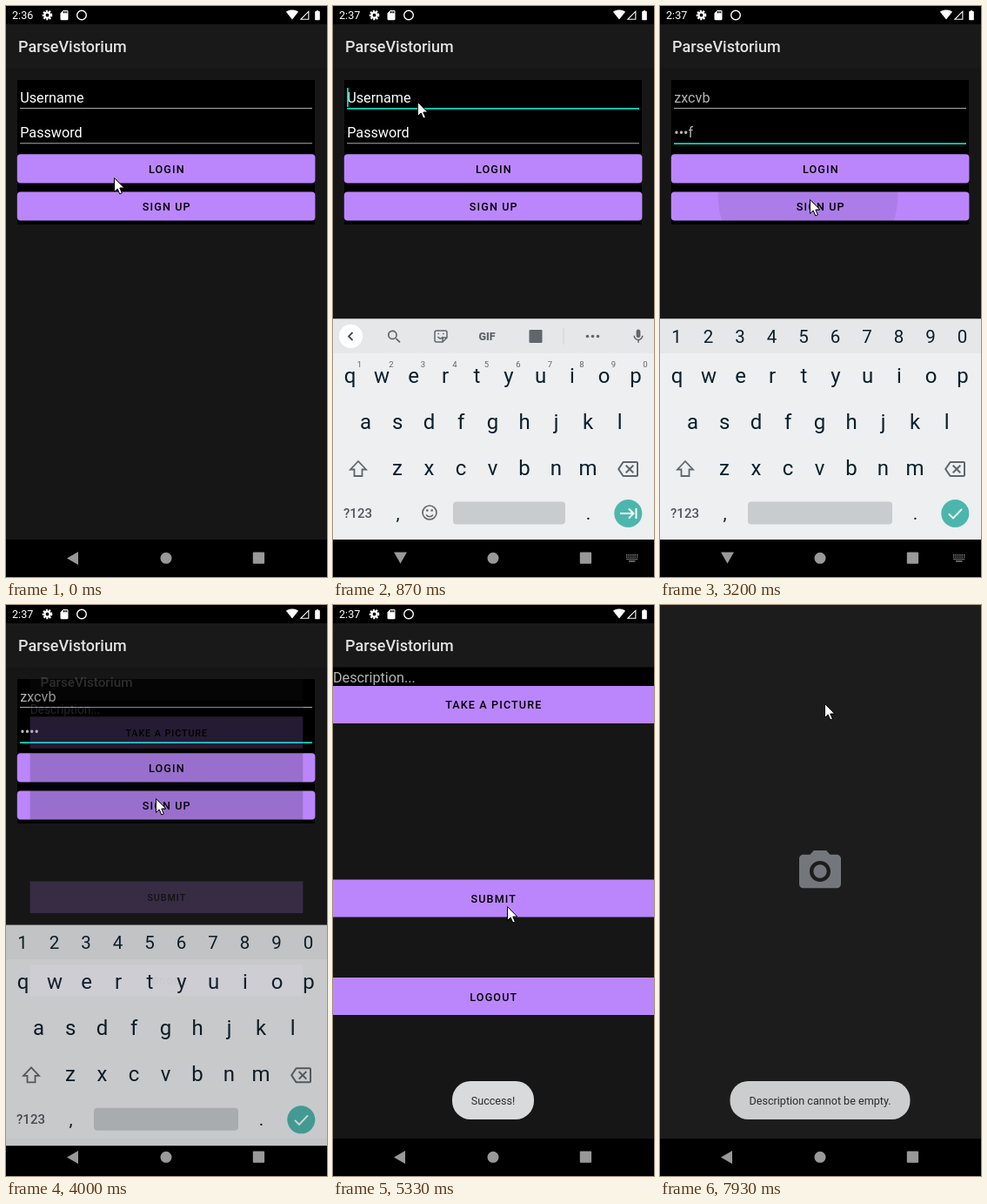
An HTML page with a canvas that plays this animation: 369 by 656 pixels, repeating every 8000 ms.

```html
<!DOCTYPE html>
<html lang="en">
<head>
<meta charset="utf-8">
<title>Login demo</title>
<style>
html, body { margin: 0; width: 369px; height: 656px; overflow: hidden; background: #000 }
canvas { display: block }
</style>
</head>
<body>
<canvas id="stage" width="369" height="656"></canvas>
<script>
const LOOP = 8000, STEP = 1000 / 15;
const W = 369, H = 656, NAV = 613;
const PURPLE = '#bb86fc', TEAL = '#03dac5', DARK = '#161616', BAR = '#191919', INK = '#0b1e2b', GREY = '#5f676c';
const USER = 'zxcvb', USER_TIMES = [1130, 1200, 1260, 1260, 1530];
const PASS = 'asdf', PASS_TIMES = [2060, 2130, 2200, 2330];

const buffer = new OffscreenCanvas(W, H).getContext('2d');
let ctx = document.getElementById('stage').getContext('2d');

const ICONS = {
  sd: 'M18 2h-8L4 8v12c0 1.1.9 2 2 2h12c1.1 0 2-.9 2-2V4c0-1.1-.9-2-2-2zm-6 6h-2V4h2zm3 0h-2V4h2zm3 0h-2V4h2z',
  wifi: 'M12 21 23.6 6.5C23.2 6.2 18.7 3 12 3S.8 6.2.4 6.5z',
  signal: 'M2 22h20V2zm18-2H6.8L20 6.8z',
  battery: 'M15.7 4H14V2h-4v2H8.3C7.6 4 7 4.6 7 5.3v15.4C7 21.4 7.6 22 8.3 22h7.4c.7 0 1.3-.6 1.3-1.3V5.3C17 4.6 16.4 4 15.7 4z',
  camera: 'M9 2 7.2 4H4c-1.1 0-2 .9-2 2v12c0 1.1.9 2 2 2h16c1.1 0 2-.9 2-2V6c0-1.1-.9-2-2-2h-3.2L15 2zm3 15c-2.8 0-5-2.2-5-5s2.2-5 5-5 5 2.2 5 5-2.2 5-5 5zM8.8 12a3.2 3.2 0 1 0 6.4 0 3.2 3.2 0 1 0-6.4 0',
  search: 'M15.5 14h-.8l-.3-.3A6.5 6.5 0 1 0 13.7 14.4l.3.3v.8l5 5 1.5-1.5zm-6 0a4.5 4.5 0 1 1 0-9 4.5 4.5 0 0 1 0 9z',
  mic: 'M12 14c1.7 0 3-1.3 3-3V5c0-1.7-1.3-3-3-3S9 3.3 9 5v6c0 1.7 1.3 3 3 3zm5-3c0 2.8-2.2 5-5 5s-5-2.2-5-5H5c0 3.5 2.6 6.4 6 6.9V21h2v-3.1c3.4-.5 6-3.4 6-6.9z',
  erase: 'M22 3H7c-.7 0-1.2.3-1.6.9L0 12l5.4 8.1c.4.5.9.9 1.6.9h15c1.1 0 2-.9 2-2V5c0-1.1-.9-2-2-2zm0 16H7.1L2.4 12l4.7-7H22zm-11.6-2L14 13.4l3.6 3.6 1.4-1.4-3.6-3.6L19 8.4 17.6 7 14 10.6 10.4 7 9 8.4l3.6 3.6L9 15.6z'
};

// Pointer path: time, x, y
const POINTER = [
  [0, 124, 197], [270, 92, 118], [470, 92, 118], [870, 97, 110], [1660, 97, 110], [1870, 100, 147],
  [2660, 100, 147], [2930, 172, 222], [4740, 172, 222], [4930, 149, 154], [5070, 200, 346],
  [6000, 200, 346], [6470, 191, 154], [6930, 189, 113], [LOOP, 189, 113]
];

const ramp = (t, a, b) => Math.min(1, Math.max(0, (t - a) / (b - a)));
const smooth = p => p * p * (3 - 2 * p);
const easeOut = (p, power) => 1 - Math.pow(1 - p, power);
const within = (t, a, b) => t >= a && t < b;
const typed = (times, t) => times.filter(k => t >= k).length;

function rect(x, y, w, h, color, r = 0) {
  ctx.fillStyle = color;
  ctx.beginPath();
  ctx.roundRect(x, y, w, h, r);
  ctx.fill();
}
function disc(x, y, r, color) {
  ctx.fillStyle = color;
  ctx.beginPath();
  ctx.arc(x, y, r, 0, 7);
  ctx.fill();
}
function shape(d, color, rule = 'nonzero') {
  ctx.fillStyle = color;
  ctx.fill(new Path2D(d), rule);
}
function line(d, color, width = 1.6) {
  ctx.strokeStyle = color;
  ctx.lineWidth = width;
  ctx.stroke(new Path2D(d));
}
function text(str, x, y, size, color, { align = 'left', weight = 400, spacing = 0 } = {}) {
  ctx.font = `${weight} ${size}px Roboto, sans-serif`;
  ctx.letterSpacing = spacing + 'px';
  ctx.textAlign = align;
  ctx.fillStyle = color;
  ctx.fillText(str, x, y);
}
const centered = (str, x, y, size, color, weight) => text(str, x, y, size, color, { align: 'center', weight });
function icon(name, cx, cy, size, color) {
  scoped(() => {
    ctx.translate(cx - size / 2, cy - size / 2);
    ctx.scale(size / 24, size / 24);
    shape(ICONS[name], color);
  });
}
function scoped(draw) {
  ctx.save();
  draw();
  ctx.restore();
}
// Draws a whole layer first, then blends it as one
function group(alpha, draw) {
  if (alpha <= 0) return;
  const page = ctx;
  ctx = buffer;
  ctx.clearRect(0, 0, W, H);
  scoped(draw);
  ctx = page;
  scoped(() => {
    ctx.globalAlpha = alpha;
    ctx.drawImage(buffer.canvas, 0, 0);
  });
}
function zoom(s) {
  ctx.translate(W / 2, H / 2);
  ctx.scale(s, s);
  ctx.translate(-W / 2, -H / 2);
}

function button(label, x, y, w, h, r, baseline) {
  rect(x, y, w, h, PURPLE, r);
  text(label, 184.8, baseline, 12.6, '#000', { align: 'center', weight: 500, spacing: 1.12 });
}
function appBar() {
  rect(0, 21, W, 50.5, BAR);
  text('ParseVistorium', 14, 53, 18, '#e2e2e2', { weight: 500 });
}

function field(hint, value, baseline, focused, caretOn) {
  text(value || hint, 16.2, baseline, 16.2, value ? '#b4b4b4' : '#fff');
  const caretX = value ? 16.2 + ctx.measureText(value).width : 16;
  if (caretOn) rect(caretX, baseline - 17, 1.8, 22, TEAL);
  rect(16, baseline + 6, 336, focused ? 1.8 : 1, focused ? TEAL : '#aaa');
}

function login(t) {
  rect(0, 21, W, NAV - 21, DARK);
  appBar();
  rect(13, 85, 342, 166, '#000');
  const onUser = within(t, 460, 1790), onPass = t >= 1790;
  field('Username', USER.slice(0, typed(USER_TIMES, t)), 111, onUser, onUser);
  const n = typed(PASS_TIMES, t);
  const shown = t >= 3800 ? n : n - 1;
  const secret = n ? '•'.repeat(shown) + PASS.slice(shown, n) : '';
  field('Password', secret, 151.3, onPass, within(t, 1790, 2800) || within(t, 3320, 3800));
  button('LOGIN', 12.8, 170.3, 342.6, 33.2, 4, 191.5);
  button('SIGN UP', 12.8, 213.4, 342.6, 33.2, 4, 234.6);
  if (within(t, 3190, 3600)) scoped(() => {
    ctx.globalAlpha = 0.08 * (1 - ramp(t, 3320, 3600));
    ctx.beginPath();
    ctx.roundRect(12.8, 213.4, 342.6, 33.2, 4);
    ctx.clip();
    disc(170, 216, 103.5 + (t - 3200) * 0.6, '#000');
  });
}

function compose() {
  rect(0, 21, W, NAV - 21, DARK);
  appBar();
  rect(0, 71.5, W, 22, '#000');
  text('Description...', 0, 89, 16.2, '#b4b4b4');
  button('TAKE A PICTURE', 0, 93, W, 43, 0, 119.2);
  button('SUBMIT', 0, 315.5, W, 43, 0, 342);
  button('LOGOUT', 0, 428, W, 43, 0, 454.5);
}

function camera(t) {
  rect(0, t >= 7860 ? 0 : 21, W, NAV, '#1c1c1c');
  rect(0, NAV, W, H - NAV, '#000');
  group(ramp(t, 7800, 7920), () => icon('camera', 184, 306, 57.6, '#73777b'));
}

function statusBar(t) {
  rect(0, 0, W, 21, '#000');
  if (t >= 7530) return;
  text(t < 460 ? '2:36' : '2:37', 7, 15, 12.6, '#fff');
  ctx.setLineDash([2, 1.4]);
  line('M52.2 10.5a4.7 4.7 0 1 0-9.4 0a4.7 4.7 0 1 0 9.4 0', '#fff', 2.2);
  ctx.setLineDash([]);
  line('M50.6 10.5a3.1 3.1 0 1 0-6.2 0a3.1 3.1 0 1 0 6.2 0', '#fff', 2.4);
  icon('sd', 67, 10.5, 13.5, '#fff');
  line('M92.3 10.5a5.3 5.3 0 1 0-10.6 0a5.3 5.3 0 1 0 10.6 0', '#fff', 1.4);
  icon('wifi', 329, 10, 14.5, '#fff');
  icon('signal', 343, 10.3, 13, '#fff');
  icon('battery', 358, 10.5, 13.5, '#fff');
}

function navIcons(keyboardUp) {
  const color = '#999';
  shape(keyboardUp ? 'M70 627.500h15l-7.500 13z' : 'M83 627v15l-13-7.500z', color);
  disc(184, 634.3, 6.5, color);
  rect(283.8, 627.5, 13.3, 13.3, color, 1);
  if (!keyboardUp) return;
  for (let i = 0; i < 12; i++) rect(337 + i % 6 * 2.4, 630 + (i / 6 | 0) * 2.4, 1.4, 1.4, '#888');
  rect(337, 634.8, 13.4, 1.4, '#666');
  rect(340, 637.2, 7.4, 1.4, '#888');
}

function keyRow(keys, x, baseline, size) {
  [...keys].forEach((key, i) => centered(key, x + i * 36.5, baseline, size, INK));
}

function toolbar(word) {
  disc(20.5, 379.3, 13.6, '#fff');
  line(word ? 'M18.500 375l4.500 4.500l-4.500 4.500' : 'M22.500 375l-4.500 4.500l4.500 4.500', '#444c52', 1.8);
  icon('mic', 351, 379.5, 19, GREY);
  if (word) {
    [word, word + 's', word + 'er'].forEach((w, i) => centered(w, 84 + i * 100, 384, 14.5, INK));
    rect(134, 371, 1, 18, '#cfd4d7');
    rect(234, 371, 1, 18, '#cfd4d7');
    return;
  }
  icon('search', 70.5, 380, 20, GREY);
  line('M119 373h10q2 0 2 2v6l-5 5h-7q-2 0-2-2v-9q0-2 2-2zM131 381h-3q-2 0-2 2v3M120.500 380q3 4 6 0M120.500 376.500h1.500M126 376.500h1.500', GREY, 1.5);
  centered('GIF', 177, 383.5, 12.5, GREY, 900);
  rect(225.5, 372, 15, 15, GREY, 1);
  rect(264.5, 370, 1, 19, '#cfd4d7');
  for (const x of [292.5, 298.5, 304.5]) disc(x, 379.5, 1.8, GREY);
}

function keyboard(t) {
  const digits = t >= 1860;
  rect(0, 359.5, W, NAV - 359.5, '#edeff1');
  rect(0, 359.5, W, 39.5, '#e5e7e9');
  if (digits) keyRow('1234567890', 19, 387, 20.5);
  else {
    toolbar(USER.slice(0, typed(USER_TIMES, t)));
    [...'1234567890'].forEach((d, i) => centered(d, 30.5 + i * 36.5, 415, 9.5, GREY));
  }
  keyRow('qwertyuiop', 19.5, 433, 24);
  keyRow('asdfghjkl', 37.6, 486, 24);
  keyRow('zxcvbnm', 74, 539, 24);
  line('M29 523l-9 9.500h4.500v7.500h9v-7.500h4.500z', GREY, 1.8);
  icon('erase', 339, 532, 24, GREY);
  centered('?123', 28.5, 588, 15, '#4c565c', 500);
  centered(',', 74.5, 590, 21, INK);
  centered('.', 293.5, 590, 21, INK);
  const spaceX = digits ? 101 : 138;
  rect(spaceX, 569.5, 267 - spaceX, 26, '#c8cccf', 4);
  if (!digits) {
    line('M119 582a8 8 0 1 0-16 0a8 8 0 1 0 16 0M107 584.500q4 4.500 8 0', GREY);
    disc(108.3, 579.5, 1.3, GREY);
    disc(113.7, 579.5, 1.3, GREY);
  }
  disc(339.3, 583, 16, '#4db6ac');
  line(digits ? 'M332 583.500l5 5l10-10.500' : 'M330 583h15M340 577.500l5.500 5.500l-5.500 5.500M348.500 577v12', '#fff', 1.9);
}

function toast(message, width, alpha) {
  group(alpha, () => {
    rect(184 - width / 2, 547, width, 44, '#d9dadb', 21);
    centered(message, 184, 574, 12.6, '#2b2b2b');
  });
}

function pointer(t) {
  const i = POINTER.findIndex((k, j) => j && t <= k[0]);
  const [t0, x0, y0] = POINTER[i - 1], [t1, x1, y1] = POINTER[i];
  const p = smooth(ramp(t, t0, t1));
  scoped(() => {
    ctx.translate(x0 + (x1 - x0) * p, y0 + (y1 - y0) * p);
    const arrow = 'M.5.5v16l3.700-3.500l2.600 6l2.600-1.100l-2.600-5.900h5z';
    shape(arrow, '#fff');
    line(arrow, '#000', 1);
  });
}

function draw(t) {
  rect(0, 0, W, H, '#000');
  const opening = easeOut(ramp(t, 4000, 4440), 8);
  const closing = easeOut(ramp(t, 3980, 4200), 2);
  const keyboardUp = within(t, 530, 4000);

  if (t < 4130) scoped(() => {
    zoom(1 + 0.05 * opening);
    login(t);
  });
  if (within(t, 4000, 7530)) group(ramp(t, 3980, 4080), () => {
    zoom(0.85 + 0.15 * opening);
    compose();
  });
  statusBar(t);
  rect(0, NAV, W, H - NAV, '#000');

  if (keyboardUp) scoped(() => {
    ctx.beginPath();
    ctx.rect(0, 0, W, NAV);
    ctx.clip();
    ctx.translate(0, 253 * (1 - easeOut(ramp(t, 500, 800), 2)));
    keyboard(t);
  });
  if (t >= 4000) group(1 - closing, () => {
    ctx.translate(0, 48 * closing);
    zoom(1 + 0.05 * opening);
    keyboard(t);
  });

  if (t >= 7530) camera(t);
  navIcons(keyboardUp);
  toast('Success!', 94, easeOut(ramp(t, 4040, 4490), 3) * (1 - ramp(t, 5820, 6120)));
  toast('Description cannot be empty.', 207, easeOut(ramp(t, 5920, 6400), 3) * (1 - ramp(t, 7900, 8400)));
  pointer(t);
}

function tick(now) {
  draw(Math.floor((now % LOOP + 4) / STEP) * STEP % LOOP);
  requestAnimationFrame(tick);
}
requestAnimationFrame(tick);
</script>
</body>
</html>
```
